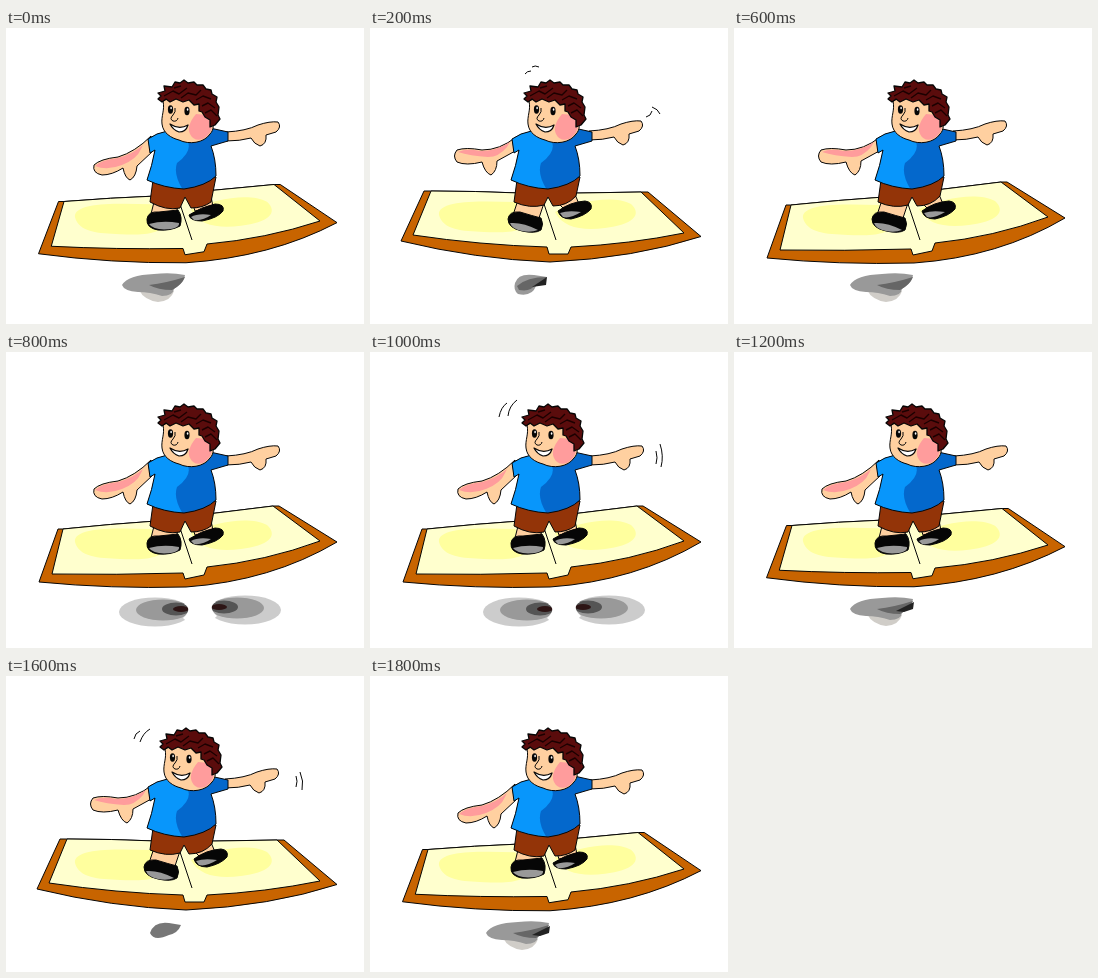
Animation, 358 px wide and 296 px high, one loop 1.9 s. Source, as an HTML page with a canvas:

```html
<!DOCTYPE html>
<html lang="en">
<head>
<meta charset="utf-8">
<title>Flying book</title>
<style>
html, body { margin: 0; width: 100%; height: 100%; overflow: hidden; background: #fff; }
canvas { display: block; }
</style>
</head>
<body>
<canvas id="stage" width="358" height="296"></canvas>
<script>
const ctx = document.getElementById('stage').getContext('2d');
const SKIN = '#ffd0a0', PINK = '#ff9c9c', INK = '#060606';
const BROWN = '#c86400', SHORTS = '#933408', HAIR = '#5a0c0c';

function shape(d, fill, line = INK, width = 1) {
  const path = new Path2D(d);
  if (fill) { ctx.fillStyle = fill; ctx.fill(path); }
  if (line) { ctx.strokeStyle = line; ctx.lineWidth = width; ctx.stroke(path); }
}

function oval(x, y, rx, ry, fill) {
  ctx.beginPath();
  ctx.ellipse(x, y, rx, ry, 0, 0, 7);
  ctx.fillStyle = fill;
  ctx.fill();
}

function shifted(dx, dy, paint) {
  ctx.save();
  ctx.translate(dx, dy);
  paint();
  ctx.restore();
}

// tilt: 0 = level, 1 = left side down
function drawBook(tilt) {
  const m = (a, b) => a + (b - a) * tilt;
  const left = m(163, 177), right = m(164, 154), innerX = m(271, 267);
  const topEdge = `L${innerX} ${right} L210 ${m(165, 161)} L150 ${m(165, 169)}
    Q105 ${m(163, 172)} ${m(61, 57)} ${left}`;
  shape(`M${m(54, 52)} ${left} L${m(31, 33)} ${m(213, 230)}
    Q105 ${m(231, 237)} 180 ${m(234, 235)}
    Q265 ${m(230, 229)} 331 ${m(208.5, 190)}
    L${m(278, 273)} ${right} ${topEdge} Z`, BROWN);
  shape(`M${m(61, 57)} ${left} L${m(43, 46)} ${m(207, 222)}
    Q110 ${m(217, 223)} 177 ${m(219, 221)} L179 ${m(226, 227)}
    L198 ${m(226, 223)} L201 ${m(219, 215)}
    Q260 ${m(216, 209)} 314 ${m(205, 189)} ${topEdge} Z`, '#ffffce');
  shifted(0, m(0, 3), () =>
    shape('M69 187 C67 172 110 173 145 174 L161 190 C158 205 134 205 114 204 C92 203 73 202 69 187Z', '#ffff9e', null));
  shifted(0, m(2, -1), () =>
    shape('M185 182 C210 170 245 165 261 174 C273 185 262 195 235 198 C213 201 193 198 185 182Z', '#ffff9e', null));
  shape('M173 173 L186 212', null);
}

function drawLegs(leaning) {
  if (leaning) {
    shape('M148 172 L143 187 Q155 193 169 190 L174 175Z', SKIN);
    shape('M185 172 L195 182 L209 176 L204 164Z', SKIN);
    shape('M138 191 Q139 183 150 184 Q163 188 171 190 Q174 196 171 202 Q165 206 152 203 Q138 200 138 191Z', INK);
    shape('M140 195 Q153 194 168 202 Q161 205 152 203 Q142 201 140 195Z', '#999', null);
    shape('M188 183 Q200 174 215 173 Q223 174 221 181 Q215 188 201 191 Q190 191 188 183Z', INK);
    shape('M190 185 Q198 182 211 184 Q200 191 193 189Z', '#999', null);
    shape('M147 152 L144 174 Q160 181 174 177 L178 169 L183 178 Q197 178 206 168 L210 149Z', SHORTS);
  } else {
    shape('M148 174 L145 186 Q157 191 170 187 L172 177Z', SKIN);
    shape('M186 174 L189 183 L207 179 L205 168Z', SKIN);
    shape('M141 191 Q142 183 153 184 L172 182 Q177 189 174 198 Q165 203 152 202 Q140 200 141 191Z', INK);
    shape('M143 196 Q157 192 173 195 Q174 199 165 201 Q148 203 143 196Z', '#999', null);
    shape('M183 187 Q195 179 209 176 Q219 176 217 183 Q212 190 196 193 Q184 193 183 187Z', INK);
    shape('M185 189 Q192 185 205 187 Q197 193 188 192Z', '#999', null);
    shape('M147 152 L144 174 Q160 183 174 180 L179 169 L185 180 Q197 180 205 174 L210 149Z', SHORTS);
  }
}

function drawArms(leaning, lift) {
  shifted(-lift / 2, -lift, () => {
    if (leaning) {
      shape('M146 109 Q130 122 112 122 Q96 119 87 122 Q82 128 87 134 Q96 138 112 134 Q115 145 121 147 Q127 143 127 133 L147 122Z', SKIN);
      shape('M140 114 Q127 123 110 123 Q96 120 88 124 Q100 128 118 129 Q129 129 137 119Z', PINK, null);
    } else {
      shape('M145 108 Q129 124 112 129 Q94 131 88 137 Q86 145 96 147 Q106 147 117 140 Q119 150 124 152 Q130 149 131 138 L147 123Z', SKIN);
      shape('M137 117 Q127 126 112 130 Q95 132 89 138 Q101 143 116 137 Q131 131 135 121Z', PINK, null);
    }
  });
  shifted(leaning ? -1 : 0, leaning ? -1 : 0, () =>
    shape('M220 104 Q240 103 252 97 Q264 93 272 94 Q276 99 270 104 L260 107 Q261 116 254 118 Q248 116 245 110 Q234 113 220 113Z', SKIN));
}

function drawShirt() {
  const outline = 'M151 106 L142 111 L144 125 L149 122 Q146 138 141 152 Q158 160 178 161 Q200 158 210 148 Q210 131 205 118 L222 113 L222 104 L204 100 L165 102Z';
  shape(outline, '#0468cc', null);
  ctx.save();
  ctx.clip(new Path2D(outline));
  shape('M140 100 H182 V114 Q186 124 171 135 Q167 146 177 162 H138Z', '#0896fb', null);
  ctx.restore();
  shape(outline);
}

function drawHead() {
  shape('M157 73 C159 82 155 88 156 96 C157 105 165 110 173 112 C183 117 198 115 204 106 C208 102 208 96 206 88 L195 69 L170 67Z', SKIN);
  shape('M190 86 Q180 98 184 106 Q188 114 197 111 Q206 106 206 96 L201 87Z', PINK, null);
  shape(`M156 74 L152 71 L155 68 L152 65 L159 63 L158 58 L166 59 L169 54 L174 55
    L178 52 L182 55 L188 54 L191 57 L197 57 L200 61 L205 62 L206 66 L211 69 L210 74
    L213 79 L212 87 L214 91 L209 97 L204 99 L204 92 L199 89 L196 84 L193 83 L193 76
    L188 77 L183 72 L177 74 L170 71 L164 74 L160 71Z`, HAIR, INK, 1.3);
  shape('M158 68 l9-5 l6 3 l8-6 M175 70 l7-5 l8 2 l5-5 M190 72 l7-4 l8 3 M196 78 l6-3 l7 5 M199 85 l6-3 l6 6 M168 60 l7-2', null, '#1c0000', 1.4);
  for (const [x, y] of [[164.5, 81.5], [181, 83]]) {
    oval(x, y, 2.6, 4.2, INK);
    oval(x + .6, y - 1.5, .8, 1.2, '#fff');
  }
  shape('M169 80 q1 4-2 7 q-4 4 0 6 q4 1 5-3', null);
  shape('M164 96 Q173 102 182 97 Q180 104 173 104 Q167 102 164 96Z', '#fff', INK, 1.2);
}

function wideShadow(tip) {
  shape('M133 262 Q150 258 168 263 Q165 273 152 274 Q138 272 133 262Z', '#d0cdc8', null);
  shape('M116 257 Q122 247 148 246 Q165 244 179 247 Q179 253 168 261 Q167 268 156 268 Q144 264 132 264 Q118 263 116 257Z', '#999', null);
  shape('M143 257 Q160 255 179 249 Q176 257 166 262 Q152 262 143 257Z', '#666', null);
  if (tip) shape('M162 259 L180 250 L179 257 L170 260Z', '#222', null);
}

function halfShadow() {
  oval(149, 260, 36, 14.5, '#ccc');
  oval(157, 258, 27, 10.5, '#999');
  oval(170, 257, 14, 6.5, '#555');
  oval(175, 257, 8, 3, '#2d1515');
  shape('M187 243 L178 252 Q187 257 177 266 L190 278Z', '#fff', null);
}

const shadows = {
  wide: () => wideShadow(false),
  tipped: () => wideShadow(true),
  split() {
    halfShadow();
    ctx.save();
    ctx.translate(388, -2);
    ctx.scale(-1, 1);
    halfShadow();
    ctx.restore();
  },
  small() {
    shape('M145 255 Q148 245 164 247 L177 249 Q174 256 166 258 Q162 269 148 266 Q143 262 145 255Z', '#999', null);
    shape('M147 258 Q157 249 177 249 Q173 257 165 257 Q161 264 149 262Z', '#666', null);
    shape('M162 259 L177 249 L176 257Z', '#222', null);
  },
  low() {
    shape('M137 258 Q139 245 158 246 L175 247 Q171 255 166 258 Q160 270 146 268 Q138 266 137 258Z', '#aaa', null);
    shape('M141 257 Q154 252 175 248 Q171 260 158 262 Q145 263 141 257Z', '#666', null);
  },
  thin: () => shape('M144 257 Q148 245 163 247 L175 249 Q172 257 163 259 Q148 266 144 257Z', '#777', null)
};

const marks = {
  level: 'M155 46 q2-3 6-3 M162 39 q3-2 7 0 M276 89 q5-1 6-6 M282 79 q6 2 8 7',
  swing: 'M129 65 q2-10 8-14 M138 64 q1-10 9-16 M286 99 q2 7 0 13 M290 92 q4 12 1 23',
  sway: 'M128 63 q1-6 6-8 M134 66 q3-9 10-13 M290 100 q2 5 0 11 M294 96 q4 9 2 18'
};

// A head shift above 0 means the boy leans; lift raises his left arm
const middle = { tilt: .75, shift: 0, shadow: 'wide' };
const low = { tilt: .31, shift: 3, lift: 3, shadow: 'low' };
const high = { tilt: 1, shift: 0, shadow: 'split' };
const level = { tilt: 0, shift: 2 };
const poses = [
  middle,
  { ...level, shadow: 'small', mark: 'level' },
  low,
  { tilt: 1, shift: 2, shadow: 'wide' },
  high,
  { ...high, mark: 'swing' },
  { ...middle, shadow: 'tipped' },
  low,
  { ...level, shadow: 'thin', mark: 'sway' },
  { ...middle, shadow: 'tipped' }
];

function draw(time) {
  const { tilt, shift, lift = 0, shadow, mark } = poses[Math.floor(time % 1900 / 200)];
  const leaning = shift > 0;
  ctx.fillStyle = '#fff';
  ctx.fillRect(0, 0, 358, 296);
  ctx.lineJoin = 'round';
  shadows[shadow]();
  drawBook(tilt);
  drawLegs(leaning);
  drawArms(leaning, lift);
  drawShirt();
  shifted(shift, 0, drawHead);
  if (mark) shape(marks[mark], null);
}

const start = performance.now();
function tick() {
  draw(performance.now() - start);
  requestAnimationFrame(tick);
}
tick();
</script>
</body>
</html>
```
